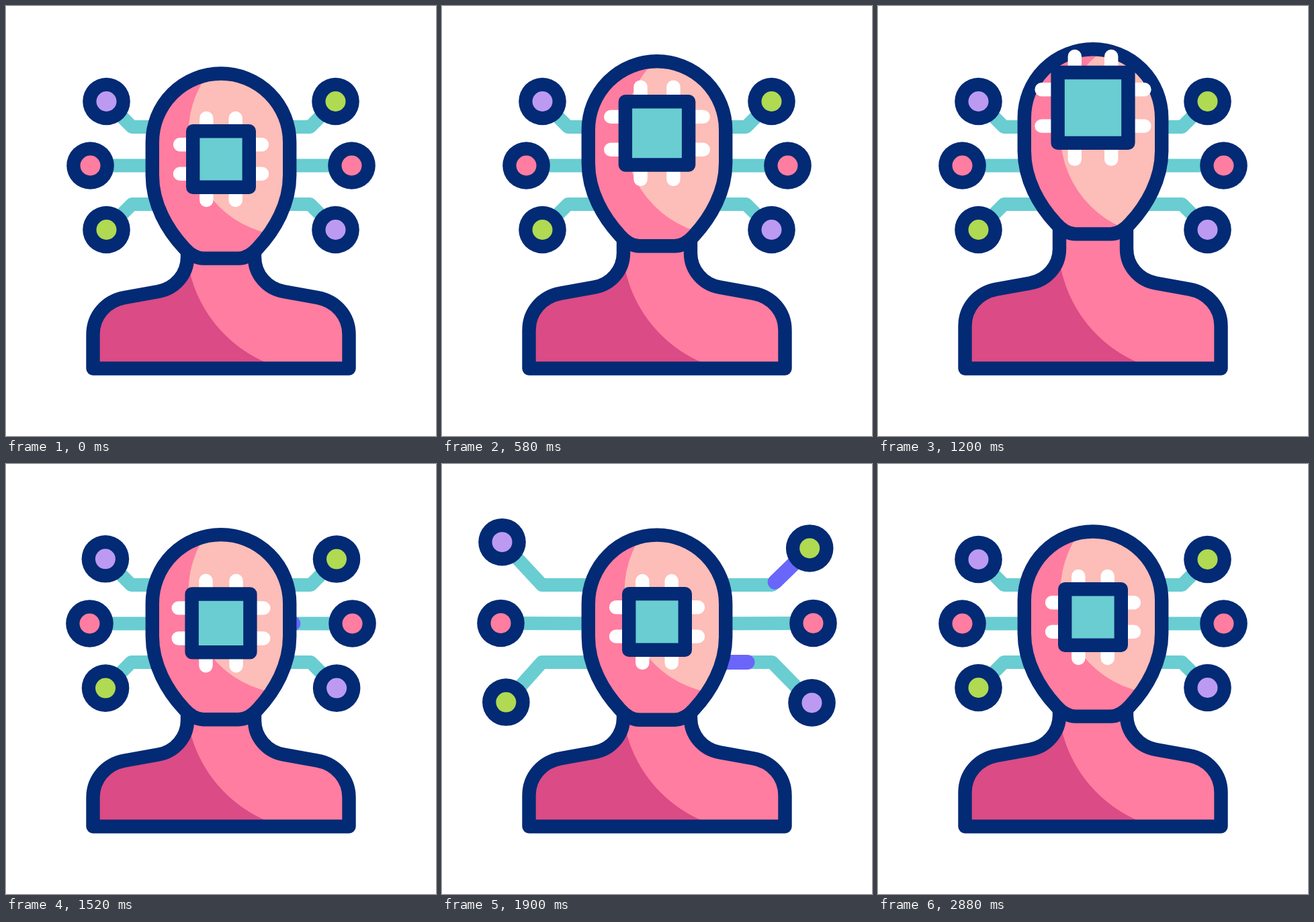
Animation of 640 by 640 pixels, one loop 3 s. Source, as an HTML page with a canvas:

```html
<!DOCTYPE html>
<html lang="en">
<head>
<meta charset="utf-8">
<title>Chip mind</title>
<style>
  html, body { margin: 0; width: 100%; height: 100%; overflow: hidden; background: #fff; }
  canvas { display: block; width: 640px; height: 640px; }
</style>
</head>
<body>
<canvas id="stage" width="640" height="640"></canvas>
<script>
const ctx = document.getElementById('stage').getContext('2d');
const LOOP = 3000, STEP = 20, LINE = 20.4;
const NAVY = '#032a74', PINK = '#ff7da0', PEACH = '#fdbdb8', ROSE = '#db4b85',
      TEAL = '#69cdd2', LILAC = '#bc9af2', GREEN = '#b0da51', INDIGO = '#6a66fa';

// Symmetric cubic ease; w is the length of both handles.
function ease(x, w = 1 / 3) {
  if (x <= 0) return 0;
  if (x >= 1) return 1;
  let lo = 0, hi = 1, s = 0.5;
  for (let i = 0; i < 24; i++) {
    s = (lo + hi) / 2;
    const r = 1 - s;
    if (3 * w * s * r * r + 3 * (1 - w) * s * s * r + s * s * s < x) lo = s; else hi = s;
  }
  return s * s * (3 - 2 * s);
}

// keys: [time, value] pairs
function track(t, keys, w) {
  for (let i = 1; i < keys.length; i++) {
    const [t0, a] = keys[i - 1], [t1, b] = keys[i];
    if (t < t1) return a + (b - a) * ease((t - t0) / (t1 - t0), w);
  }
  return keys[keys.length - 1][1];
}

const headKeys = [[0, 0], [1167, -36.9], [1667, 15.5], [2047, 0]];
const bodyKeys = [[0, 0], [1167, -12.8], [1667, 12.9], [2047, 0]];
const chipKeys = [[0, 0], [1167, -78], [1633, 24], [2047, 0]];
const sizeKeys = [[0, 1], [1167, 1.257], [1633, 1]];
const spreadKeys = [[1385, 0], [2085, 1], [2870, 0]];

// side, rest position, travel, line height, pulse order
const nodes = [
  { side: -1, x: 149.5, y: 142, dx: -63.5, dy: -27.3, row: 180, order: 5, color: LILAC },
  { side: -1, x: 125.5, y: 237.5, dx: -40.2, dy: -0.6, row: 237.5, order: 3, color: PINK },
  { side: -1, x: 149.5, y: 333, dx: -57.3, dy: 22.8, row: 295, order: 4, color: GREEN },
  { side: 1, x: 490.5, y: 142, dx: 60, dy: -17.5, row: 180, order: 1, color: GREEN },
  { side: 1, x: 514.5, y: 237.5, dx: 40.2, dy: -0.6, row: 237.5, order: 0, color: PINK },
  { side: 1, x: 490.5, y: 333, dx: 63.5, dy: 23.7, row: 295, order: 2, color: LILAC }
];

function stroke(path, color, width = LINE) {
  ctx.strokeStyle = color;
  ctx.lineWidth = width;
  path ? ctx.stroke(path) : ctx.stroke();
}

function disc(x, y, r, color) {
  ctx.beginPath();
  ctx.arc(x, y, r, 0, Math.PI * 2);
  ctx.fillStyle = color;
  ctx.fill();
}

function drawWire(n, t, spread) {
  const x = n.x + n.dx * spread, y = n.y + n.dy * spread;
  const start = 320 + n.side * 80;
  const points = [[start, n.row]];
  if (n.row !== n.y) points.push([320 + n.side * (132.5 + 41 * spread), n.row]);
  points.push([x, y]);

  const path = new Path2D();
  let length = 0;
  points.forEach(([px, py], i) => {
    if (!i) return path.moveTo(px, py);
    path.lineTo(px, py);
    length += Math.hypot(px - points[i - 1][0], py - points[i - 1][1]);
  });
  stroke(path, TEAL, 20);

  const age = t - 1502 - 174 * n.order;
  const front = 12 + age * 0.85, tail = Math.max(0, front - 105);
  if (age > 0 && tail < length) {
    ctx.setLineDash([Math.min(front, length) - tail, 9999]);
    ctx.lineDashOffset = -tail;
    stroke(path, INDIGO, 22);
    ctx.setLineDash([]);
  }
  disc(x, y, 35.3, NAVY);
  disc(x, y, 15, n.color);
}

function drawBody(dy, headDy) {
  const y = v => v + dy;
  const top = 358 + headDy;
  const p = new Path2D();
  p.moveTo(270, top);
  p.lineTo(270, y(374));
  p.bezierCurveTo(270, y(399), 252, y(420.5), 226.5, y(425));
  p.lineTo(176.5, y(434));
  p.bezierCurveTo(149, y(439), 129.5, y(461), 129.5, y(489));
  p.lineTo(129.5, 539.5);
  p.lineTo(510.5, 539.5);
  p.lineTo(510.5, y(489));
  p.bezierCurveTo(510.5, y(461), 491, y(439), 463.5, y(434));
  p.lineTo(413.5, y(425));
  p.bezierCurveTo(388, y(420.5), 370, y(399), 370, y(374));
  p.lineTo(370, top);
  ctx.save();
  ctx.clip(p);
  ctx.fillStyle = ROSE;
  ctx.fillRect(110, 280, 420, 270);
  disc(464.5, 350, 196.5, PINK);
  ctx.restore();
  ctx.lineCap = 'butt';
  stroke(p, NAVY);
  ctx.lineCap = 'round';
}

function drawHead(dy) {
  const y = v => v + dy;
  const p = new Path2D();
  p.moveTo(217.8, y(252));
  p.lineTo(217.8, y(202.7));
  p.arc(320, y(202.7), 102.2, Math.PI, 0);
  p.lineTo(422.2, y(252));
  p.bezierCurveTo(422.2, y(295), 400, y(333), 375, y(360));
  p.bezierCurveTo(367, y(369), 357, y(375.6), 346, y(375.6));
  p.lineTo(294, y(375.6));
  p.bezierCurveTo(283, y(375.6), 273, y(369), 265, y(360));
  p.bezierCurveTo(240, y(333), 217.8, y(295), 217.8, y(252));
  p.closePath();
  ctx.save();
  ctx.clip(p);
  ctx.fillStyle = PINK;
  ctx.fillRect(200, 40, 240, 380);
  disc(423.5, 190, 152, PEACH);
  ctx.restore();
  stroke(p, NAVY);
}

function drawChip(dy, k) {
  const cx = 320, cy = 228 + dy, reach = 61 * k, gap = 21.7 * k, half = 41.8 * k;
  ctx.beginPath();
  for (const g of [-gap, gap]) {
    ctx.moveTo(cx + g, cy - reach);
    ctx.lineTo(cx + g, cy + reach);
    ctx.moveTo(cx - reach, cy + g);
    ctx.lineTo(cx + reach, cy + g);
  }
  stroke(null, '#fff');
  ctx.beginPath();
  ctx.rect(cx - half, cy - half, half * 2, half * 2);
  ctx.fillStyle = TEAL;
  ctx.fill();
  stroke(null, NAVY);
}

function draw(t) {
  ctx.fillStyle = '#fff';
  ctx.fillRect(0, 0, 640, 640);
  ctx.lineJoin = ctx.lineCap = 'round';
  const spread = track(t, spreadKeys, 0.8), headDy = track(t, headKeys);
  nodes.forEach(n => drawWire(n, t, spread));
  drawBody(track(t, bodyKeys), headDy);
  drawHead(headDy);
  drawChip(track(t, chipKeys), track(t, sizeKeys));
}

const begin = performance.now();
function tick() {
  const t = (performance.now() - begin) % LOOP;
  draw(Math.floor(t / STEP) * STEP);
  requestAnimationFrame(tick);
}
tick();
</script>
</body>
</html>
```
